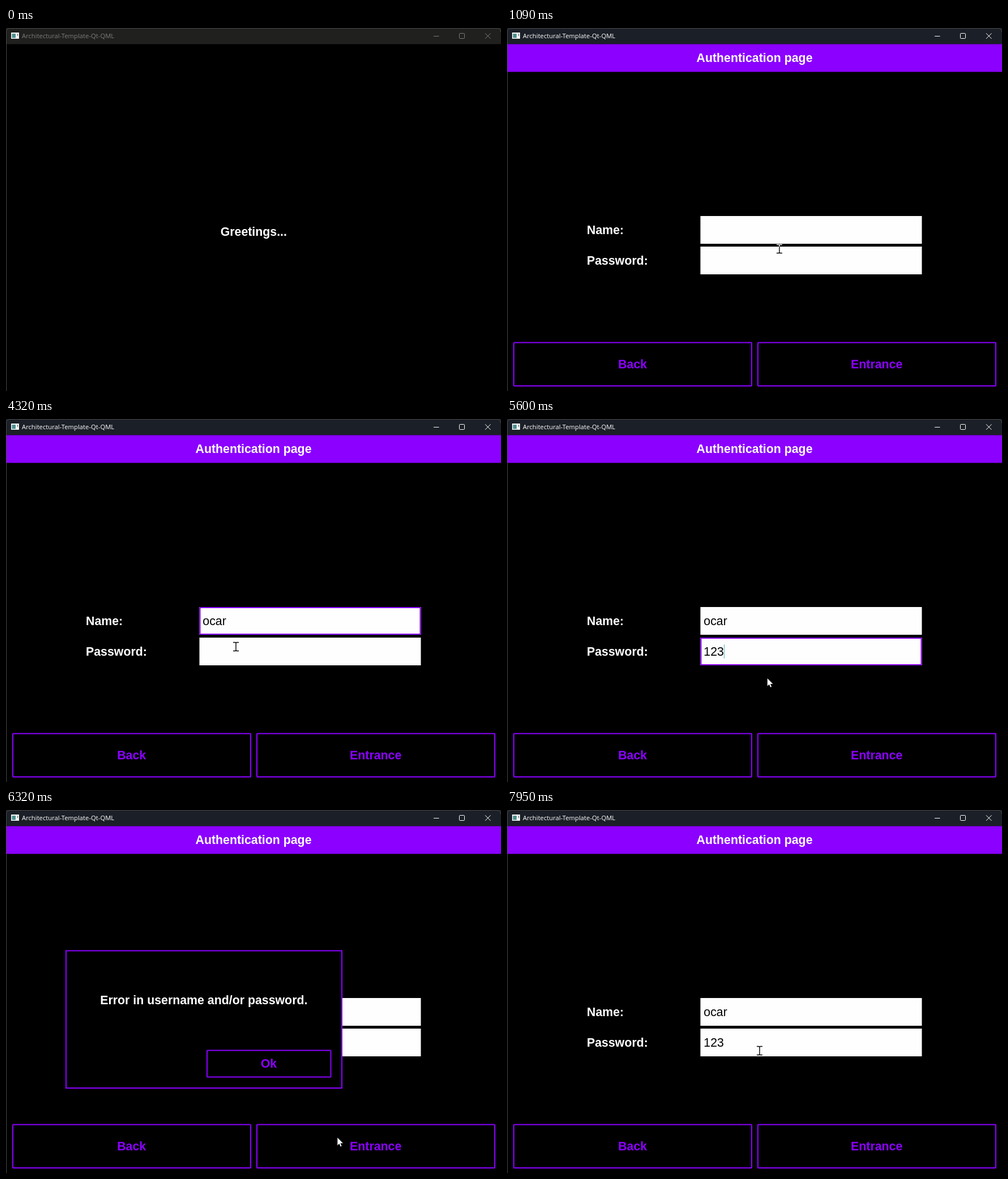
Recreate the animation shown at these times as an HTML page. Size 874 px wide and 641 px high, loop 8000 ms.

```html
<!DOCTYPE html>
<html lang="en">
<head>
<meta charset="utf-8">
<title>Authentication page</title>
<style>
  html, body { margin: 0; width: 100%; height: 100%; overflow: hidden; background: #000; }
  svg { display: block; width: 874px; height: 641px; }
  text { font: bold 21.333px "Liberation Sans", Arial, sans-serif; fill: #fff; white-space: pre; }
  .mid { text-anchor: middle; }
  .field text { font-weight: normal; fill: #000; }
  .field > rect:first-child { fill: #fefefe; }
  .ring { fill: none; stroke: #8b00ff; stroke-width: 2; }
  .button rect { fill: #000; stroke: #8b00ff; stroke-width: 2; }
  .button text { fill: #8b00ff; }
  .button.down rect { fill: #8b00ff; }
  .button.down text { fill: #000; }
  .caret { fill: #55b5c0; }
  #bar { fill: #1b1f27; color: #fff; }
  #bar.idle { fill: #20201e; color: #7c7c7c; }
  #bar text { font: 11.27px "Open Sans", "Noto Sans", sans-serif; fill: currentColor; }
  #bar path { fill: none; stroke: currentColor; }
  #beam { fill: none; stroke: #fff; stroke-width: 1.4; mix-blend-mode: difference; }
</style>
</head>
<body>
<svg viewBox="0 0 874 641">
  <rect width="874" height="641"/>
  <g id="bar">
    <rect width="874" height="28.5"/>
    <rect x="9" y="8" width="14" height="11" fill="#f2f5f4"/>
    <rect x="10.5" y="10" width="6.5" height="7.5" fill="#4d8f8f"/>
    <rect x="20" y="10" width="1" height="4" fill="#555"/>
    <text x="28" y="18">Architectural-Template-Qt-QML</text>
    <path d="M755 14.5h9.5M800.5 10.5q0-1 1-1h7q1 0 1 1v7q0 1-1 1h-7q-1 0-1-1zM846 9.3l9.6 9.6m0-9.6l-9.6 9.6"/>
  </g>

  <text id="hello" class="mid" x="437.3" y="367">Greetings...</text>

  <g id="page">
    <rect x="1" y="28.5" width="873" height="49" fill="#8b00ff"/>
    <text class="mid" x="437" y="60">Authentication page</text>
    <text x="141" y="364">Name:</text>
    <text x="141" y="418">Password:</text>
    <g id="name" class="field">
      <rect x="341.5" y="332" width="391" height="49"/>
      <rect class="ring" x="342.5" y="333" width="389" height="47"/>
      <text x="347.3" y="364"></text>
      <rect class="caret" y="344" width="1" height="26"/>
    </g>
    <g id="pass" class="field">
      <rect x="341.5" y="386" width="391" height="49"/>
      <rect class="ring" x="342.5" y="387" width="389" height="47"/>
      <text x="347.3" y="418"></text>
      <rect class="caret" y="398" width="1" height="25"/>
    </g>
    <g class="button">
      <rect x="12" y="555.5" width="420" height="76.5" rx="1"/>
      <text class="mid" x="221.7" y="601">Back</text>
    </g>
    <g id="enter" class="button">
      <rect x="443" y="555.5" width="420" height="76.5" rx="1"/>
      <text class="mid" x="652.7" y="601">Entrance</text>
    </g>
  </g>

  <g id="popup">
    <rect x="106" y="248.5" width="487" height="242.5" stroke="#8b00ff" stroke-width="2"/>
    <text class="mid" x="349.3" y="343">Error in username and/or password.</text>
    <g id="ok" class="button">
      <rect x="355" y="424.5" width="218.5" height="47" rx="1"/>
      <text class="mid" x="464" y="455">Ok</text>
    </g>
  </g>

  <path d="M.5 641V7q0-6.5 6.5-6.5H867q6.5 0 6.5 6.5" fill="none" stroke="#484848"/>

  <path id="beam" d="M-5-7.5H-1L0-6.5 1-7.5H5M0-6.5V6.5M-5 7.5H-1L0 6.5 1 7.5H5"/>
  <path id="arrow" d="M0 0V14.7L3.3 11.6 5.5 16.6 8 15.6 5.8 10.7H10.5Z" fill="#fff" stroke="#000" stroke-width=".6"/>
</svg>
<script>
const LOOP = 8000;
const $ = id => document.getElementById(id);
const show = (el, on) => el.style.display = on ? "" : "none";

// Pointer: time, x, y
const track = [
  [380, 719, 582], [690, 480, 390], [1110, 481, 390], [1650, 435, 356],
  [3850, 435, 356], [4000, 433, 358], [4250, 415, 372], [4320, 406, 402],
  [5100, 406, 402], [5600, 459, 457], [5730, 525, 508], [6060, 585, 578],
  [6500, 585, 578], [7000, 472, 452], [7750, 472, 452], [7890, 453, 443], [7950, 446, 425]
];

// Focus interval, and the times at which the characters are typed
const fields = [
  { el: $("name"), word: "ocar", keys: [2590, 2790, 3060, 3260], from: 1730, to: 4450 },
  { el: $("pass"), word: "123", keys: [4730, 4990, 5330], from: 4450, to: 6200 }
];

function pointer(t) {
  const i = track.findIndex(k => k[0] > t);
  if (i < 0) return track[track.length - 1].slice(1);
  const [a, b] = [track[Math.max(i - 1, 0)], track[i]];
  const p = a === b ? 0 : (t - a[0]) / (b[0] - a[0]);
  return [a[1] + (b[1] - a[1]) * p, a[2] + (b[2] - a[2]) * p];
}

function drawField({ el, word, keys, from, to }, t) {
  const [, ring, text, caret] = el.children;
  const typed = keys.filter(k => k <= t);
  const value = word.slice(0, typed.length);
  const focus = t >= from && t < to;
  const last = typed.length ? typed[typed.length - 1] : from;
  if (text.textContent !== value) text.textContent = value;
  show(ring, focus);
  show(caret, focus && t - last < 535);
  caret.setAttribute("x", Math.round(347.3 + (value ? text.getComputedTextLength() : 0)));
}

function draw(t) {
  const page = t >= 1000;
  const popup = t >= 6310 && t < 7750;
  $("bar").classList.toggle("idle", t < 930 || (t >= 7610 && t < 7750));
  show($("hello"), !page);
  show($("page"), page);
  show($("popup"), popup);
  $("enter").classList.toggle("down", t >= 6200 && t < 6310);
  $("ok").classList.toggle("down", t >= 7610);
  fields.forEach(f => drawField(f, t));

  const [x, y] = pointer(t);
  const overField = page && !popup && x > 341 && x < 733 && y > 332 && y < 435;
  show($("beam"), overField);
  show($("arrow"), !overField && t >= 380);
  for (const id of ["beam", "arrow"]) $(id).setAttribute("transform", `translate(${x} ${y})`);
}

const start = performance.now();
function tick() {
  draw((performance.now() - start) % LOOP);
  requestAnimationFrame(tick);
}
tick();
</script>
</body>
</html>
```
